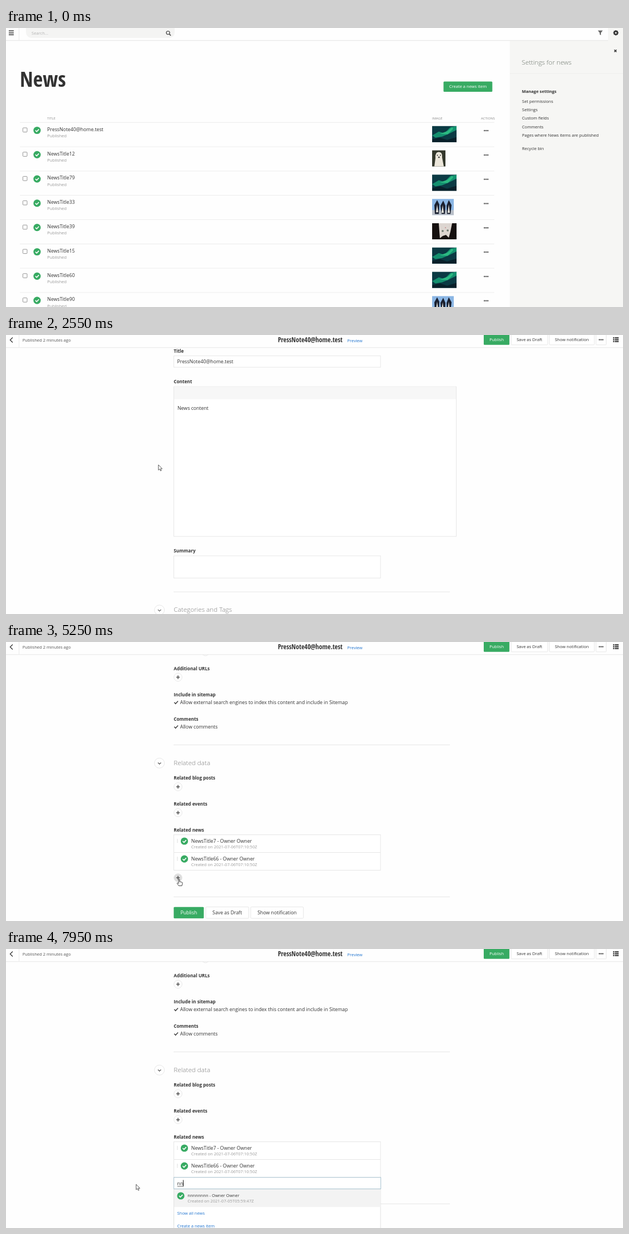
These frames come from a looping animation (1112x503 px, 8 s). An HTML page:

```html
<!DOCTYPE html>
<html lang="en">
<head>
<meta charset="utf-8">
<title>News editor</title>
<style>
html, body { margin: 0; width: 100%; height: 100%; overflow: hidden; background: #fefefe; }
svg { display: block; font-family: "Open Sans", "Noto Sans", sans-serif; }
text { white-space: pre; }
.cond { font-family: "Open Sans Condensed", "Open Sans", sans-serif; font-weight: 700;
  font-stretch: 75%; font-variation-settings: "wdth" 75; }
</style>
</head>
<body>
<svg id="stage" width="1112" height="503" viewBox="0 0 1112 503"></svg>
<script>
const LOOP = 8000;
const GREEN = '#38ab63', INK = '#333', GREY = '#999', EDGE = '#e4e4e4', BLUE = '#1f73cf', PAGE = '#fefefe';
const MAIL = 'PressNote40@home.test', OWNER = 'Owner Owner';

// Drawing helpers, each returns SVG markup
const text = (x, y, s, size = 8.77, fill = INK, more = '') =>
  `<text x="${x}" y="${y}" font-size="${size}" fill="${fill}" ${more}>${s}</text>`;
const rect = (x, y, w, h, fill, more = '') =>
  `<rect x="${x}" y="${y}" width="${w}" height="${h}" fill="${fill}" ${more}/>`;
const box = (x, y, w, h, edge = EDGE, r = 0) => rect(x, y, w, h, '#fff', `stroke="${edge}" stroke-width=".9" rx="${r}"`);
const path = (d, stroke = INK, w = 1, fill = 'none') =>
  `<path d="${d}" stroke="${stroke}" stroke-width="${w}" fill="${fill}"/>`;
const disc = (x, y, r, fill, more = '') => `<circle cx="${x}" cy="${y}" r="${r}" fill="${fill}" ${more}/>`;
const group = (id, s, more = '') => `<g id="${id}" ${more}>${s}</g>`;
const hline = (x1, x2, y, c = EDGE) => path(`M${x1} ${y}H${x2}`, c, .9);
const label = (y, s) => text(302.3, y + 3, s, 8.2, INK, 'font-weight="700"');
const ring = (x, y, r) => disc(x, y, r, '#fff', `stroke="${EDGE}" stroke-width=".9"`);
const tick = (x, y) => disc(x, y, 6.6, GREEN) + path(`M${x - 3} ${y}l2.3 2.3l4 -4.2`, '#fff', 1.6);
const plus = y => ring(310, y, 7.3) + path(`M306.8 ${y}h6.4M310 ${y - 3.2}v6.4`, '#555', 1.6);
const dots = (x, y) => [0, 3, 6].map(d => disc(x + d, y, 1.25, '#555')).join('');
const section = (y, s) => ring(276.5, y + .8, 9) + path(`M273.8 ${y}l2.8 2.7l2.8 -2.7`, '#555', 1.1) +
  text(302.3, y + 4, s, 11.7, '#7d7d7d', 'font-weight="300"');
const button = (x, y, w, h, s, size, green) =>
  (green ? rect(x, y, w, h, GREEN, 'rx="1.5"') : box(x, y, w, h, EDGE, 1.5)) +
  text(x + w / 2, y + h / 2 + size * .36, s, size, green ? '#fff' : INK, 'text-anchor="middle"');
const field = (y, s) => label(y, s) + box(302.5, y + 8.5, 372.5, 20.5);

const photos = {
  aurora: [44, '#0b3a44', '<path d="M0 17L12 10L22 13L33 2L44 0V7L30 14L18 19L6 21Z" fill="#14906f"/><path d="M14 14L28 9L36 2L38 5L28 15Z" fill="#2cba82"/><path d="M0 24L14 21L27 25L44 20V29H0Z" fill="#08202a"/>'],
  dog: [24, '#34382c', '<path d="M4 29L6 14Q5 3 12 3Q19 3 18 13L21 29Z" fill="#ece7db"/><circle cx="9.5" cy="9" r="1" fill="#333"/><circle cx="15" cy="9" r="1" fill="#333"/><circle cx="12.3" cy="12.5" r="1.4" fill="#333"/>'],
  birds: [39, '#8bb6e4', '<path d="M0 20H39V29H0Z" fill="#b9bfc8"/><path d="M5 27L4 11L9 2L13 10L12 27ZM17 27L15 12L20 3L24 12L23 27ZM27 27L26 12L30 2L35 11L33 27Z" fill="#1a2030"/><path d="M9 10L11 24L7 24ZM19 11L21 25L17 25ZM30 10L32 25L28 25Z" fill="#f1eee4"/>'],
  cat: [44, '#15100f', '<path d="M12 0L36 0L33 15L30 26L25 21L19 23L14 27L13 14Z" fill="#ddd6d1"/><circle cx="19" cy="14" r="1.8" fill="#69766c"/><circle cx="28" cy="13" r="1.8" fill="#69766c"/><circle cx="24" cy="8" r="1" fill="#c58d8d"/>']
};
const news = [[MAIL, 'aurora'], ['NewsTitle12', 'dog'], ['NewsTitle79', 'aurora'], ['NewsTitle33', 'birds'],
  ['NewsTitle39', 'cat'], ['NewsTitle15', 'aurora'], ['NewsTitle60', 'aurora'], ['NewsTitle90', 'birds']];

function newsRow([title, kind], i) {
  const y = 170.3 + 43.8 * i, [w, back, shapes] = photos[kind];
  return hline(25, 880, y, '#ebebeb') + box(30.4, y + 9.7, 7.6, 7.6, '#888', 1) + tick(56, y + 14.2) +
    text(74.3, y + 15.5, title) + text(74.3, y + 26.6, 'Published', 7.6, GREY) +
    `<g transform="translate(768 ${y + 6.5})">${rect(0, 0, w, 29, back)}${shapes}</g>` + dots(862.3, y + 14.8);
}

function listPage() {
  const gear = [0, 45, 90, 135].map(a => rect(1098, 4, 2.2, 9.4, INK, `transform="rotate(${a} 1099.1 8.7)"`)).join('');
  const links = [['Set permissions', 132], ['Settings', 147.3], ['Custom fields', 162.5], ['Comments', 177.8],
    ['Pages where News items are published', 193], ['Recycle bin', 217]];
  return rect(908, 23, 204, 480, '#f6f6f4') + rect(1085, 0, 27, 23, '#f6f6f4') + rect(0, 21.8, 1085, 1.4, '#e9e9e9') +
    path('M5 5.2H14M5 8.7H14M5 12.2H14', INK, 1.4) + path('M23.5 0V22', '#ececec') +
    path('M36 0H304V8A10 10 0 0 1 294 18H46A10 10 0 0 1 36 8Z', 'none', 0, '#f4f4f3') + text(46, 12, 'Search...', 7.6, '#b3b3b3') +
    disc(292, 8.6, 3, 'none', 'stroke="#555" stroke-width="1.4"') + path('M294.2 10.8L297 13.6', '#555', 1.7) +
    path('M1066.7 4.5H1075.5L1072.2 8.7V13L1070 11.5V8.7Z', 'none', 0, '#666') +
    gear + disc(1099.1, 8.7, 3.7, INK) + disc(1099.1, 8.7, 1.5, '#f6f6f4') +
    text(25, 105.5, 'News', 38, INK, 'class="cond"') + button(788.5, 96.5, 88, 18.5, 'Create a news item', 7.6, true) +
    text(74.3, 165.3, 'TITLE', 6, '#888') + text(768, 165.3, 'IMAGE', 6, '#888') + text(856, 165.3, 'ACTIONS', 6, '#888') +
    news.map(newsRow).join('') +
    path('M1096.3 39.2l4 4m0 -4l-4 4', INK, 1.6) + text(929.6, 66, 'Settings for news', 11.7, '#697269', 'font-weight="300"') +
    hline(908, 1112, 82, '#ededeb') + text(929.8, 117, 'Manage settings', 7.6, INK, 'font-weight="700"') +
    links.map(([s, y]) => text(930, y + 2.8, s, 7.6)).join('');
}

const related = (name, y) => [-2.5, 0, 2.5].map(d => rect(308.4, y + d - .5, 1, 1, '#aaa')).join('') + tick(321.5, y + .5) +
  text(333.8, y + 3, `${name} - ${OWNER}`) + text(333.8, y + 13.6, 'Created on 2021-07-06T07:10:50Z', 7.57, GREY);
const checked = (y, s) => path(`M303.2 ${y - .2}l2.4 2.5l4.4 -4.8`, '#444', 1.5) + text(313.8, y + 3.2, s);

function form() {
  return field(-895, 'Title') + text(308.5, -873, MAIL) + label(-840, 'Content') +
    box(302.5, -831, 509, 270) + rect(303, -830.5, 508, 22, '#f7f7f7') + text(309, -789, 'News content') +
    label(-535, 'Summary') + box(302.5, -526, 372.5, 40) + hline(302, 800, -461) +
    section(-429, 'Categories and Tags') + label(-402, 'Categories') + plus(-386) + label(-355, 'Tags') + plus(-339) +
    hline(302, 800, -284) + section(-252, 'Additional info') +
    field(-220, 'Author') + field(-167.2, 'Source name') + field(-114.6, 'Source URL') +
    hline(302, 800, -58.5) + section(-27, 'More options (URL, Comments)') +
    label(1, 'URL') + text(302.3, 19.6, 'pressnote40') + ring(359.5, 17.5, 7.3) + path('M357 20l.6 -1.8l3.3 -3.3l1.2 1.2l-3.3 3.3Z', '#444', .7, '#444') +
    label(47.7, 'Additional URLs') + plus(63.5) +
    label(94.5, 'Include in sitemap') + checked(109, 'Allow external search engines to index this content and include in Sitemap') +
    label(138.5, 'Comments') + checked(153, 'Allow comments') + hline(302, 800, 185.5) +
    section(217.5, 'Related data') + label(245, 'Related blog posts') + plus(261) + label(292, 'Related events') + plus(307.7) +
    label(338.6, 'Related news') + box(302.5, 347.5, 372.5, 64) + hline(302.5, 675, 379.5) +
    related('NewsTitle7', 358.5) + related('NewsTitle66', 390.7) +
    group('remove', path('M653.5 355.5l5 5m0 -5l-5 5', '#777', 1.1)) +
    disc(310, 425, 7.5, '#dedede', 'id="hover"').replace('#dedede', '#fff') + plus(425).replace('<circle', '<circle id="add"') +
    hline(302, 800, 459.5) + button(302.3, 477.7, 54.2, 20.5, 'Publish', 8.77, true) +
    button(360, 477.7, 77.5, 20.5, 'Save as Draft', 8.77) + button(441, 477.7, 95, 20.5, 'Show notification', 8.77);
}

function editBar() {
  return rect(0, 0, 1112, 22.5, PAGE) + rect(0, 22, 1112, 1.3, '#ececec') + path('M23.5 0V22', '#ececec') +
    path('M12 4.5L7.5 9L12 13.5', INK, 1.3) + text(29.8, 11.8, 'Published 2 minutes ago', 7.6, '#555') +
    text(606.5, 13.3, MAIL, 12.2, INK, 'class="cond" text-anchor="end"') + text(615, 13.3, 'Preview', 7.6, BLUE) +
    button(861, -1, 46.3, 18.8, 'Publish', 7.6, true) + button(910.3, -1, 66, 18.8, 'Save as Draft', 7.6) +
    button(979.3, -1, 81, 18.8, 'Show notification', 7.6) + box(1063.3, -1, 18.5, 18.8, EDGE, 1.5) + dots(1069.5, 8.5) +
    [5, 8.3, 11.6].map(y => rect(1094, y - 1, 2.3, 2.3, '#444') + rect(1097.2, y - 1, 7, 2.3, '#444')).join('');
}

const option = (name, date, y) => tick(315, y + 12) + text(327.3, y + 14, `${name} - ${OWNER}`, 7.6) +
  text(327.3, y + 24.3, `Created on ${date}Z`, 7.6, GREY);

function picker() {
  return rect(302.5, 433, 372.5, 80, '#fff', 'stroke="#ddd" stroke-width=".9"') + rect(303, 433, 371.5, 32.3, '#f3f3f3') +
    group('recent', ['NewsTitle90', 'NewsTitle60', 'NewsTitle15'].map((n, i) => option(n, '2021-07-06T07:10:50', 433 + 32.3 * i)).join('')) +
    group('found', option('nnnnnnnn', '2021-07-05T05:59:47', 433) +
      text(308.6, 479.2, 'Show all news', 7.6, BLUE) + text(308.6, 501.7, 'Create a news item', 7.6, BLUE)) +
    box(302.5, 411.8, 373, 20.7, '#9fbccb') + text(308.6, 426, '', 8.77, INK, 'id="typed"') +
    path('M308.8 428H319.6', '#555', .9).replace('<path', '<path id="spell"') + rect(308.2, 416.5, 1, 11.5, '#111', 'id="caret"');
}

const cursors =
  group('arrow', path('M0 0V9.6L2.2 7.6L3.8 11L5.3 10.3L3.8 7.1H6.8Z', '#333', .8, '#fff')) +
  group('hand', path('M-.9 .6Q0 -.6 .9 .6V4.6L5 5.6Q6.3 6 6 7.6L5 12H-.7L-3.6 7.9Q-3.9 6.4 -2.4 6.8L-.9 8Z', '#333', .9, '#fff')) +
  group('beam', path('M-2 -4.6H-.5L0 -4L.5 -4.6H2M0 -4V4M-2 4.6H-.5L0 4L.5 4.6H2', '#333', .9));

document.getElementById('stage').innerHTML =
  group('list', listPage()) +
  group('loader', [0, 1, 2].map(i => rect(544.8 + 6.5 * i, 267.4, 5.8, 5.8, GREEN)).join('')) +
  group('edit', group('form', form()) + group('picker', picker()) + editBar()) + cursors;

const $ = id => document.getElementById(id);
const show = (id, on) => $(id).setAttribute('visibility', on ? 'inherit' : 'hidden');
const smooth = p => p * p * (3 - 2 * p);

// Eased value between rows of [time, ...values]
function track(rows, t) {
  if (t <= rows[0][0]) return rows[0].slice(1);
  for (let i = 1; i < rows.length; i++) {
    const [a, b] = [rows[i - 1], rows[i]];
    if (t < b[0]) {
      const p = smooth((t - a[0]) / (b[0] - a[0]));
      return a.slice(1).map((v, k) => v + (b[k + 1] - v) * p);
    }
  }
  return rows[rows.length - 1].slice(1);
}

const pointer = [[220, 1002, 481], [990, 181, 207], [1080, 178, 192.4], [2060, 178, 192.4], [2460, 274.7, 234],
  [3230, 274.7, 234], [3740, 203.8, 237.8], [3980, 284, 331], [4040, 286, 333], [4400, 345, 358], [4740, 330, 375],
  [5120, 312, 427.5], [5340, 312, 427.5], [5610, 371, 422], [5710, 373, 422], [6570, 373, 422], [6790, 389.2, 417],
  [6940, 389.2, 417], [7250, 404, 440], [7730, 354, 453], [7950, 234.5, 424.3]];
const scroll = [[2480, 957], [3030, 237.2], [3170, 237.2], [3660, 0]];
const modes = [[0, ''], [220, 'arrow'], [5080, 'hand'], [5400, 'beam'], [7120, 'hand'], [7820, 'arrow']];

function draw(t) {
  const editing = t >= 1960, open = t >= 5330;
  show('list', !editing);
  $('list').setAttribute('opacity', track([[1240, 1], [1500, 0]], t)[0]);
  show('loader', t >= 1290 && !editing);
  [...$('loader').children].forEach((el, i) =>
    el.setAttribute('opacity', .42 - .14 * Math.cos((t - 1530) / 190 - i * .9 + 1.2)));

  show('edit', editing);
  $('form').setAttribute('transform', `translate(0 ${track(scroll, t)[0].toFixed(2)})`);
  show('remove', t >= 4270 && t < 4850);
  show('hover', !open);
  show('add', !open);
  $('add').setAttribute('fill', t >= 5060 ? '#dedede' : '#fff');

  show('picker', open && editing);
  show('recent', t < 6790 && open);
  show('found', t >= 6790);
  const typed = t < 6570 ? '' : t < 6650 ? 'n' : 'nn';
  if ($('typed').textContent !== typed) $('typed').textContent = typed;
  $('caret').setAttribute('x', 308.2 + 5.38 * typed.length);
  const blink = t < 5860 || (t >= 6410 && t < 7180) || t >= 7710;
  show('caret', open && blink);
  show('spell', t >= 7870);

  const mode = modes.filter(m => m[0] <= t).pop()[1], [x, y] = track(pointer, t);
  for (const id of ['arrow', 'hand', 'beam']) {
    show(id, id === mode);
    $(id).setAttribute('transform', `translate(${x.toFixed(1)} ${y.toFixed(1)})`);
  }
}

const start = performance.now();
function tickFrame() {
  draw((performance.now() - start) % LOOP);
  requestAnimationFrame(tickFrame);
}
tickFrame();
</script>
</body>
</html>
```
